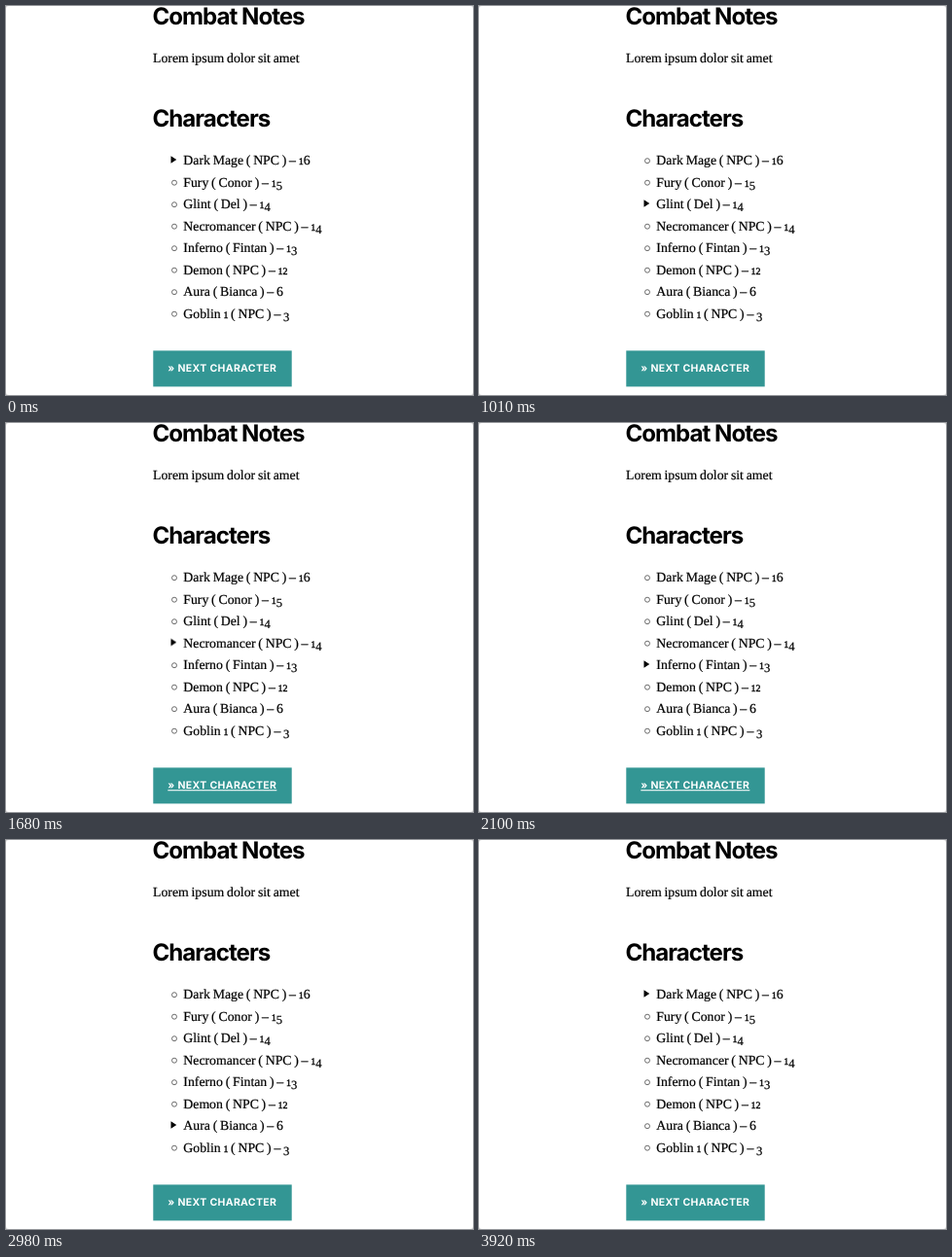
An HTML page that plays this animation: 480x400 px, repeating every 3.96 s.

```html
<!DOCTYPE html>
<html lang="en">
<head>
<meta charset="utf-8">
<title>Combat Notes</title>
<style>
  html, body { margin: 0; width: 100%; height: 100%; overflow: hidden; background: #d4d4d4; }
  svg { display: block; width: 480px; height: 400px; }
  text { text-rendering: geometricPrecision; }
  .heading { font: 700 24.1px Inter, sans-serif; letter-spacing: -0.0415em; }
  .body { font: 13.8px "Liberation Serif", serif; word-spacing: -.7px; stroke: #000; stroke-width: .2px; }
  .short { font-size: 10px; stroke-width: .35px; }
  .low { font-size: 12.6px; baseline-shift: -2.5px; }
  .ring { fill: none; stroke: #333; stroke-width: .7; }
  .label { font: 700 10.5px Inter, sans-serif; letter-spacing: .0333em; fill: #fff; }

  #turn { animation: turn 3960ms step-end infinite; }
  .label { animation: hover 3960ms step-end infinite; }

  @keyframes turn {
    0%, 97.97%, 100% { transform: translateY(0); }
    11.61% { transform: translateY(22.5px); }
    23.48% { transform: translateY(45px); }
    34.34% { transform: translateY(67.5px); }
    46.96% { transform: translateY(90px); }
    58.83% { transform: translateY(112.5px); }
    71.96% { transform: translateY(135px); }
    84.09% { transform: translateY(157.5px); }
  }
  /* The underline drops at each click and returns shortly after. */
  @keyframes hover {
    0%, 11.61%, 23.48%, 34.34%, 46.96%, 58.83%, 71.96%, 84.09%, 97.97%, 100% { text-decoration: none; }
    3.03%, 16.91%, 27.77%, 40.4%, 51.01%, 65.4%, 76.26%, 90.15% { text-decoration: underline; }
  }
</style>
</head>
<body>
<svg viewBox="0 0 480 400">
  <rect width="480" height="400" rx="3" fill="#fff"/>
  <text class="heading" x="150.5" y="19">Combat Notes</text>
  <text class="body" x="151" y="58">Lorem ipsum dolor sit amet</text>
  <text class="heading" x="150.5" y="124.4">Characters</text>
  <g id="list"></g>
  <g id="turn">
    <rect x="168" y="153" width="10" height="12" fill="#fff"/>
    <path d="M169.5 154.2L175.3 158L169.5 161.8Z"/>
  </g>
  <rect x="151.3" y="354.4" width="142.4" height="37" fill="#339694"/>
  <text class="label" x="166.3" y="376.2">» NEXT CHARACTER</text>
</svg>
<script>
  const characters = [
    ["Dark Mage", "NPC", 16],
    ["Fury", "Conor", 15],
    ["Glint", "Del", 14],
    ["Necromancer", "NPC", 14],
    ["Inferno", "Fintan", 13],
    ["Demon", "NPC", 12],
    ["Aura", "Bianca", 6],
    ["Goblin 1", "NPC", 3]
  ];

  // Old-style figures: 1 and 2 at x-height, 3 to 5 below the baseline.
  const oldStyle = text => text.replace(/[1-5]/g, digit =>
    `<tspan class="${digit < 3 ? "short" : "low"}">${digit}</tspan>`);

  document.getElementById("list").innerHTML = characters.map(([name, player, score], i) => {
    const y = 163 + i * 22.5;
    return `<circle class="ring" cx="173" cy="${y - 3.8}" r="2.5"/>
      <text class="body" x="182.3" y="${y}">${oldStyle(`${name} ( ${player} ) – ${score}`)}</text>`;
  }).join("");
</script>
</body>
</html>
```
